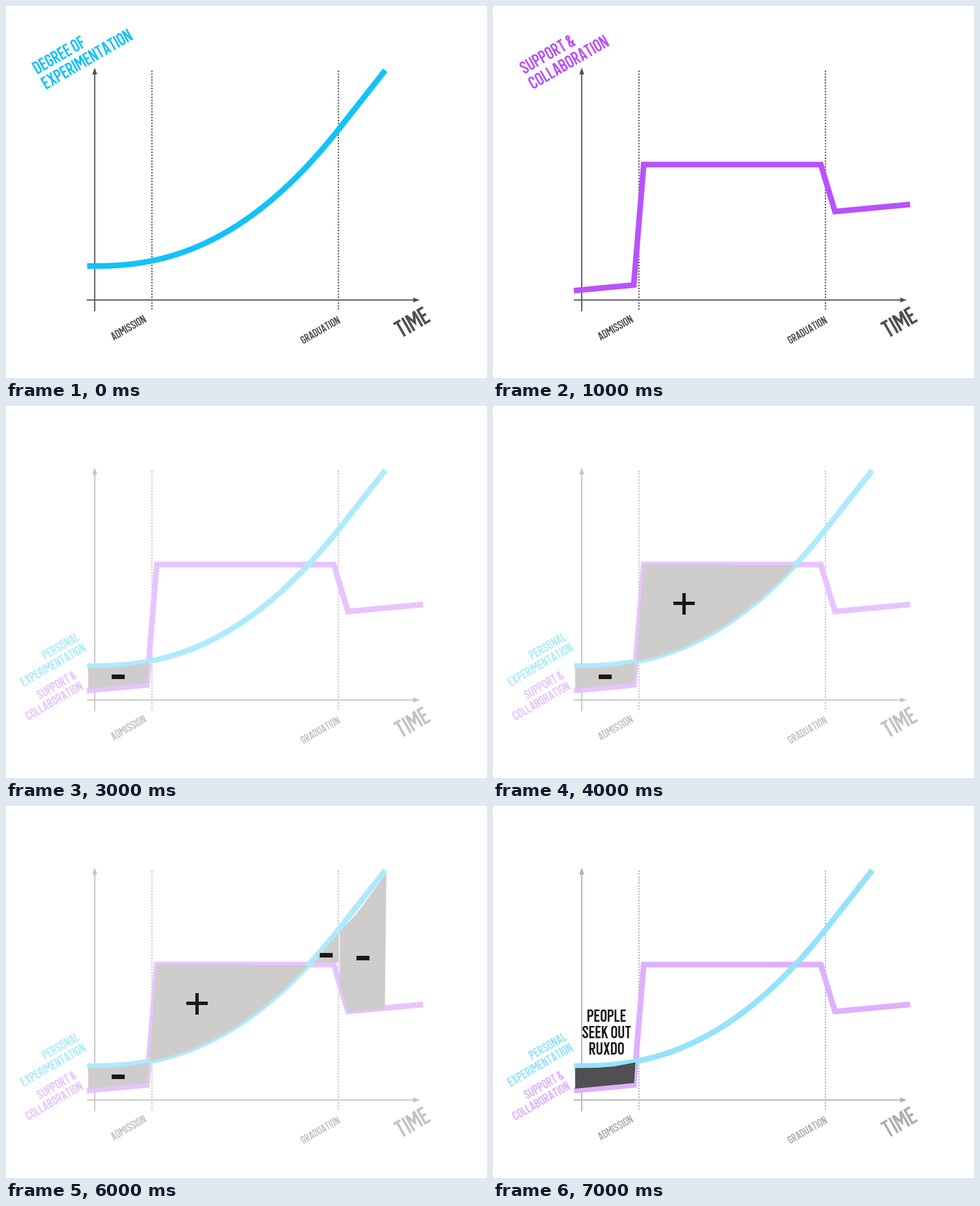
Animation, 851 px wide and 658 px high, one loop 8 s. Source, as a matplotlib script:

```python
import numpy as np
import matplotlib.pyplot as plt
from matplotlib.animation import FuncAnimation
from matplotlib.patches import PathPatch, Polygon, Rectangle
from matplotlib.path import Path
from matplotlib.transforms import Affine2D

W, H = 851, 658
DPI = 72  # one point is one pixel

INK = (80, 79, 81)
BLUE = (18, 194, 250)
PURPLE = (184, 82, 251)
GREY = (206, 205, 203)
BLACK = (26, 23, 24)

fig = plt.figure(figsize=((W + 1e-6) / DPI, (H + 1e-6) / DPI), dpi=DPI,
                 facecolor="white")
ax = fig.add_axes([0, 0, 1, 1])


def tint(rgb, fade=0.0):
    """Colour under a white veil of the given opacity."""
    return tuple((c * (1 - fade) + 255 * fade) / 255 for c in rgb)


# --- Condensed lettering: strokes in a cell of cap height 1 ---------------

STEM = 0.14
GAP = 0.095
SPACE = 0.17
L = B = STEM / 2
T = 1 - B
WIDE = 0.47
R = WIDE - L
C = WIDE / 2
RAD = C - L
HI, LO = T - RAD, B + RAD
WAIST = 0.46


def arc(x, y, r, start, end):
    t = np.radians(np.linspace(start, end, 15))
    return list(zip(x + r * np.cos(t), y + r * np.sin(t)))


def turn(y, start, end):
    return arc(C, y, RAD, start, end)


def bowl(top, bottom):
    """Right-hand bowl running from its top edge to its bottom edge."""
    return turn(top - RAD, 90, 0) + turn(bottom + RAD, 0, -90)


LOOP = turn(HI, 180, 0) + turn(LO, 0, -180)
P_SHAPE = [(L, 0), (L, T)] + bowl(T, WAIST) + [(L, WAIST)]

ROUND = {
    "O": (WIDE, [LOOP + LOOP[:2]]),
    "C": (WIDE, [[(R, 0.65)] + turn(HI, 0, 180) + turn(LO, 180, 360) + [(R, 0.35)]]),
    "G": (WIDE, [[(R, 0.67)] + turn(HI, 0, 180) + turn(LO, 180, 360)
                 + [(R, 0.47), (C, 0.47)]]),
    "U": (WIDE, [[(L, 1)] + turn(LO, 180, 360) + [(R, 1)]]),
    "D": (WIDE, [[(L, 0.5), (L, T)] + bowl(T, B) + [(L, B), (L, 0.5)]]),
    "P": (0.46, [P_SHAPE]),
    "R": (0.48, [P_SHAPE, [(0.22, 0.5), (0.42, -0.05)]]),
    "B": (WIDE, [[(L, 0.5), (L, T)] + bowl(T, 0.51) + [(L, 0.51)],
                 [(L, 0.51)] + bowl(0.51, B) + [(L, B), (L, 0.6)]]),
    "S": (0.46, [[(R, 0.69)] + turn(HI, 0, 225) + turn(LO, 45, -180) + [(L, 0.31)]]),
    "&": (0.53, [[(0.5, -0.06), (0.12, 0.7)] + arc(0.225, 0.81, 0.115, 200, -45)
                 + [(0.1, 0.38)] + arc(0.225, 0.215, 0.145, 160, 300)
                 + [(0.47, 0.46)]]),
}

STRAIGHT = {
    "E": (0.41, [[(0.41, T), (L, T), (L, B), (0.41, B)], [(L, 0.51), (0.37, 0.51)]]),
    "F": (0.4, [[(0.4, T), (L, T), (L, 0)], [(L, 0.49), (0.36, 0.49)]]),
    "L": (0.39, [[(L, 1), (L, B), (0.39, B)]]),
    "I": (STEM, [[(L, 0), (L, 1)]]),
    "T": (0.44, [[(0, T), (0.44, T)], [(0.22, 0), (0.22, T)]]),
    "K": (0.49, [[(L, 0), (L, 1)], [(0.08, 0.35), (0.41, 1.05)],
                 [(0.2, 0.6), (0.43, -0.05)]]),
    "A": (0.5, [[(0.065, -0.05), (0.225, 1.05)], [(0.435, -0.05), (0.275, 1.05)],
                [(0.12, 0.24), (0.38, 0.24)]]),
    "M": (0.66, [[(L, 0), (L, 1)], [(0.66 - L, 0), (0.66 - L, 1)],
                 [(L, 1.05), (0.33, 0.4), (0.66 - L, 1.05)]]),
    "N": (0.49, [[(L, 0), (L, 1)], [(0.49 - L, 0), (0.49 - L, 1)],
                 [(0.08, 1.05), (0.41, -0.05)]]),
    "X": (0.5, [[(0.05, -0.08), (0.45, 1.08)], [(0.45, -0.08), (0.05, 1.08)]]),
}

GLYPHS = {**ROUND, **STRAIGHT}


def write(text, x, y, cap, color, align=1.0, angle=30):
    """Set a line with its baseline at (x, y); align 0 left, 1 right."""
    points, codes, pen = [], [], 0
    for ch in text:
        if ch == " ":
            pen += SPACE
            continue
        width, strokes = GLYPHS[ch]
        for stroke in strokes:
            points += [(pen + px, py) for px, py in stroke]
            codes += [Path.MOVETO] + [Path.LINETO] * (len(stroke) - 1)
        pen += width + GAP
    pen -= GAP
    place = (Affine2D().translate(-align * pen, 0).scale(cap, -cap)
             .rotate_deg(-angle).translate(x, y))
    line = PathPatch(Path(points, codes).transformed(place), fill=False,
                     edgecolor=color, lw=STEM * cap, joinstyle="miter",
                     capstyle="butt", zorder=6)
    band = Path([(-1, 0), (pen + 1, 0), (pen + 1, 1), (-1, 1), (-1, 0)])
    line.set_clip_path(band.transformed(place), ax.transData)
    ax.add_patch(line)


def write_lines(lines, x, y, cap, color, pitch, align=1.0, angle=30):
    a = np.radians(angle)
    for k, text in enumerate(lines):
        write(text, x + k * pitch * np.sin(a), y + k * pitch * np.cos(a),
              cap, color, align, angle)


# --- Chart ---------------------------------------------------------------

def growth(x):
    """Power curve that runs on straight after graduation."""
    bend, top, power = 434, 242.4, 2.27
    u = np.maximum(np.asarray(x, float) - 155, 0) / bend
    return 460 - top * np.where(u < 1, u ** power, 1 + power * (u - 1))


STEPS = [(143, 503.5), (249, 493.5), (266.7, 280.5), (580, 280.5),
         (605, 363.5), (738, 351)]


def fill(points, color, zorder=4):
    ax.add_patch(Polygon(points, closed=True, facecolor=color, lw=0, zorder=zorder))


def stroke(x, y, color, width, **kw):
    ax.plot(x, y, color=color, lw=width, solid_capstyle="butt",
            solid_joinstyle="miter", **kw)


def draw_axes(fade):
    ink = tint(INK, fade)
    stroke([157, 157], [119, 540], ink, 2, zorder=1)
    stroke([143, 722], [520, 520], ink, 2, zorder=1)
    fill([(157, 109), (161.3, 121), (152.7, 121)], ink, 1)
    fill([(732, 520), (720.5, 515.7), (720.5, 524.3)], ink, 1)
    for x in (258.2, 588.2):
        ax.plot([x, x], [115.5, 539], color=ink, lw=2.8, zorder=1, snap=False,
                ls=(0, (0.01, 1.82)), dash_capstyle="round")
    write("ADMISSION", 249, 558.6, 14.7, ink)
    write("GRADUATION", 592, 560.4, 14.3, ink)
    write("TIME", 752, 557.7, 31, ink)


def draw_growth(fade):
    x = np.linspace(143.5, 671, 200)
    stroke(x, growth(x), tint(BLUE, fade), 10, zorder=3)


def draw_steps(fade):
    stroke(*zip(*STEPS), tint(PURPLE, fade), 10, zorder=2)


def heading(lines, color):
    write_lines(lines, 56.2, 121, 22.8, tint(color), 31, align=0)


def side_labels(fade):
    write_lines(["PERSONAL", "EXPERIMENTATION"], 131.2, 413.5, 16.4,
                tint(BLUE, fade), 22.3)
    write_lines(["SUPPORT &", "COLLABORATION"], 126.2, 481.3, 16.4,
                tint(PURPLE, fade), 22.3)


def bar(cx, cy, w, h):
    ax.add_patch(Rectangle((cx - w / 2, cy - h / 2), w, h,
                           facecolor=tint(BLACK), lw=0, zorder=7))


def minus(cx, cy):
    bar(cx, cy, 23, 8)


def early_gap(color=GREY):
    fill([(145.3, 463.5), (185, 463), (215, 460.5), (252, 453.5),
          (249.7, 490), (145.3, 500)], tint(color))


def early_lack():
    early_gap()
    minus(198, 479)


def surplus():
    x = np.linspace(534, 253, 80)
    fill([(266.7, 280.5)] + list(zip(x, growth(x))), tint(GREY))
    bar(337.8, 349.5, 38, 6)
    bar(337.8, 349.8, 6, 38)


def late_lack():
    fill([(589, 225), (589, 277), (544, 277)], tint(GREY))
    minus(566, 264)


def after_lack():
    fill([(673, 119), (670.3, 358.5), (604.5, 364.8), (590.5, 314),
          (590.5, 222), (620, 191)], tint(GREY))
    minus(631, 269)


AREAS = [early_lack, surplus, late_lack, after_lack]


def update(i):
    ax.clear()
    ax.set(xlim=(0, W), ylim=(H, 0))
    ax.axis("off")
    fade = 0 if i < 3 else 0.66 if i < 7 else 0.545
    draw_axes(fade)
    if i != 0:
        draw_steps(fade)
    if i != 1:
        draw_growth(fade)
    if i == 0:
        heading(["DEGREE OF", "EXPERIMENTATION"], BLUE)
    elif i == 1:
        heading(["SUPPORT &", "COLLABORATION"], PURPLE)
    else:
        side_labels(fade)
    if 3 <= i < 7:
        for area in AREAS[:i - 2]:
            area()
    elif i == 7:
        early_gap(INK)
        write_lines(["PEOPLE", "SEEK OUT", "RUXDO"], 201, 381.7, 22,
                    tint(BLACK), 29, align=0.5, angle=0)
    return []


anim = FuncAnimation(fig, update, frames=8, interval=1000, repeat=True,
                     repeat_delay=0, blit=False)
plt.show()
```
